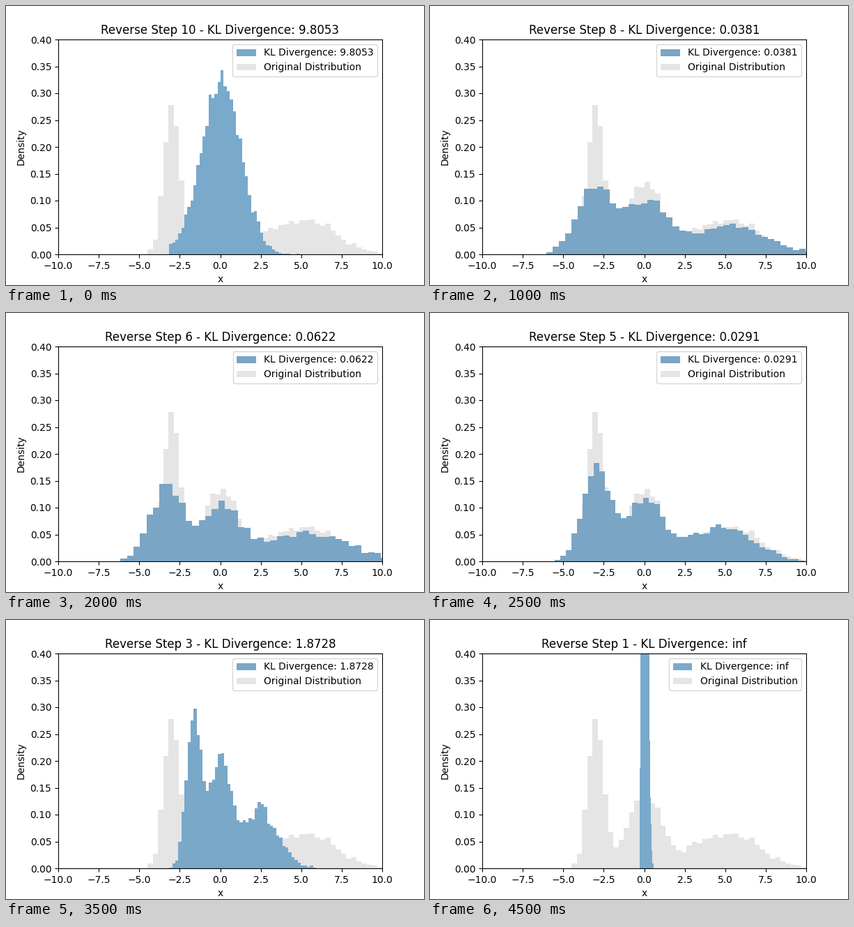
A matplotlib script that plays this animation: 600 px wide and 400 px high, repeating every 5000 ms.

```python
import numpy as np
import matplotlib.pyplot as plt
from matplotlib.animation import FuncAnimation

BARS = 50
SAMPLES = 8000
GRAY = (229 / 255,) * 3
LIGHT_BLUE = np.array([120, 173, 210]) / 255
DEEP_BLUE = np.array([122, 164, 194]) / 255

# Three equally likely normal distributions: (centre, spread, peak)
MIXTURE = [(m, s, 1 / (3 * s * np.sqrt(2 * np.pi)))
           for m, s in ((-3, 0.5), (0, 1), (5, 2))]


def density(x, bumps):
    return sum(h * np.exp(-((x - m) / s) ** 2 / 2) for m, s, h in bumps)


def histogram(left, width, bumps, seed):
    """Bar edges and heights, with the roughness of a finite sample."""
    edges = left + width * np.arange(BARS)
    per_bar = width * SAMPLES
    expected = density(edges + width / 2, bumps) * per_bar
    counts = np.random.default_rng(seed).poisson(expected)
    return edges, counts / per_bar


def blend(x, heights):
    """Bar colour deepens with the share that covers the reference."""
    shown = np.minimum(heights, 0.4)
    share = np.minimum(shown, density(x, MIXTURE)).sum() / shown.sum()
    return LIGHT_BLUE + (DEEP_BLUE - LIGHT_BLUE) * share


# Divergence, first edge, bar width, bell curves; steps count down from 10
STEPS = [
    ("9.8053", -3.153, 0.1871, [(0.05, 1.22, .327)]),
    ("0.3127", -6.4, 0.3,
     [(-2, 1.3, .115), (0.1, 1.3, .09), (3.5, 2, .065)]),
    ("0.0381", -6.047, 0.3905,
     [(-3.1, 1.1, .123), (0.1, 1.25, .098), (5.2, 2.3, .055)]),
    ("0.0467", -6.13, 0.396,
     [(-3.2, 1.08, .13), (0.1, 1.22, .098), (5.3, 2.4, .053)]),
    ("0.0622", -6.159, 0.4022,
     [(-3.28, 1.02, .14), (0.1, 1.2, .098), (5.4, 2.5, .052)]),
    ("0.0291", -5.527, 0.342,
     [(-2.95, 0.85, .17), (0.05, 1.1, .115), (4.7, 2, .064)]),
    ("0.1150", -4.443, 0.2832,
     [(-2.35, 0.6, .198), (0.1, 1.05, .137),
      (3.3, 0.6, .055), (4.8, 1.2, .066)]),
    ("1.8728", -3.153, 0.1888,
     [(-1.65, 0.45, .283), (-0.02, 0.66, .2), (2.55, 1.05, .11)]),
    ("inf", -1.57, 0.0959,
     [(-0.78, 0.25, .6), (0, 0.38, .36), (1.4, 0.52, .22)]),
    ("inf", -0.297, 0.04, [(0.05, 0.15, 2)]),
]

fig, ax = plt.subplots(figsize=(6, 4), dpi=100)


def draw_bars(edges, heights, width, **style):
    ax.bar(edges, heights, width, align="edge", **style)


def draw(frame):
    kl, left, width, bumps = STEPS[frame]
    number = len(STEPS) - frame
    label = f"KL Divergence: {kl}"
    edges, heights = histogram(left, width, bumps, number)
    ref_edges, ref_heights = histogram(-4.48, 0.3226, MIXTURE, 0)

    ax.clear()
    draw_bars(edges, heights, width, label=label, zorder=1.1,
              color=blend(edges + width / 2, heights))
    draw_bars(ref_edges, ref_heights, 0.3226, color=GRAY,
              label="Original Distribution", zorder=1)
    ax.set(xlim=(-10, 10), ylim=(0, 0.4), xlabel="x", ylabel="Density",
           title=f"Reverse Step {number} - {label}")
    ax.legend(loc="upper right")
    return []


anim = FuncAnimation(fig, draw, frames=len(STEPS), init_func=lambda: [],
                     interval=500, repeat=True, repeat_delay=0)
plt.show()
```
